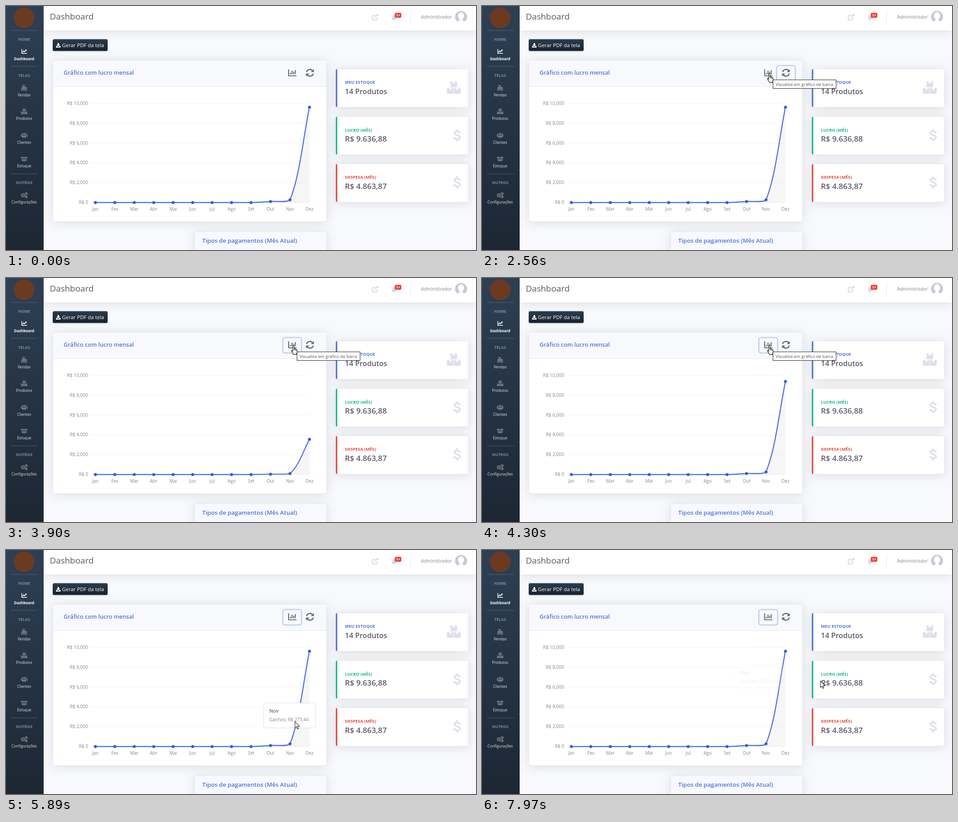
An HTML page that plays this animation: 1036x540 px, repeating every 8000 ms.

```html
<!DOCTYPE html>
<html lang="pt-BR">
<head>
<meta charset="utf-8">
<title>Dashboard</title>
<style>
html, body { margin: 0; width: 100%; height: 100%; overflow: hidden; background: #f8f9fc; }
svg { display: block; width: 100vw; height: 100vh; }
text { font-family: "Open Sans", "Noto Sans", sans-serif; white-space: pre; }
.shadow { filter: drop-shadow(0 2px 11px rgba(58, 59, 69, .15)); }
.lift { filter: drop-shadow(0 1.5px 2px rgba(58, 59, 69, .2)); }
</style>
</head>
<body>
<svg id="stage" viewBox="0 0 1036 540" preserveAspectRatio="none" xmlns="http://www.w3.org/2000/svg"></svg>
<script>
const LOOP = 8000, ANIM = 800, HOVER = 320;
const BLUE = '#4e73df', INK = '#5a5c69', GREY = '#858796', PALE = '#dddfeb', ICON = '#6b6d78';
const BASE = 435, TOP = 216;
const TO_BAR = 2624, TO_LINE = 3814;
const MONTHS = 'Jan Fev Mar Abr Mai Jun Jul Ago Set Out Nov Dez'.split(' ');
const profit = i => [104, 273.44, 9636.88][i - 9] || 0;
const yOf = v => BASE - v / 10000 * (BASE - TOP);
const lineX = i => 197 + i * 42.9;
const barX = i => 214.3 + i * 39.53;

const clamp = (v, a = 0, b = 1) => Math.min(b, Math.max(a, v));
const mix = (a, b, k) => a + (b - a) * k;
const quart = p => 1 - (1 - clamp(p)) ** 4;
const ramp = (t, from, len = 120) => clamp((t - from) / len);

// Markup helpers
const text = (x, y, s, size, fill, extra = '') =>
  `<text x="${x}" y="${y}" font-size="${size}" fill="${fill}" ${extra}>${s}</text>`;
const rect = (x, y, w, h, fill, extra = '') =>
  `<rect x="${x}" y="${y}" width="${w}" height="${h}" fill="${fill}" ${extra}/>`;
const path = (d, fill, extra = '') => `<path d="${d}" fill="${fill}" ${extra}/>`;
const at = (x, y, s, body, extra = '') =>
  `<g transform="translate(${x} ${y}) scale(${s})" ${extra}>${body}</g>`;
const stroke = (color, w) => `stroke="${color}" stroke-width="${w}" stroke-linecap="round" stroke-linejoin="round"`;
const MID = ' text-anchor="middle" ', END = ' text-anchor="end" ', SEMI = ' font-weight="600" ', BOLD = ' font-weight="700" ';

// Icons, each centred on 0,0
const crate = (x, y, c) => path(`M${x} ${y}h5v5l2.3-1.5 2.3 1.5v-5h4.9v13h-14.5z`, c);
const boxes = c => crate(-7.2, -14, c) + crate(-15, .5, c) + crate(.6, .5, c);
const dollar = c => path('M6 -5C4.5 -9.5 -6 -10 -6 -4.8S6.4 -.6 6.4 4.8S-4.5 9.5 -6.6 5.4M0 -12.5V-9M0 9V12.5', 'none', stroke(c, 3.6));
const axes = c => path('M-8 -7V6.5H8.5', 'none', stroke(c, 2.2));
const barIcon = c => axes(c) + path('M-4 3V0M-.5 3V-5M3 3V-2M6.5 3V-6', 'none', `stroke="${c}" stroke-width="2.2"`);
const lineIcon = c => axes(c) + path('M-5 2.5L-1.5 -2 1.5 1.5 6 -4', 'none', stroke(c, 2.4)) + path('M2.8 -6.2H8.2V-.8Z', c);
const refreshIcon = c => path('M-7.2 -1.6A7.2 7.2 0 0 1 5.6 -4.6M7.2 1.6A7.2 7.2 0 0 1 -5.6 4.6', 'none', `stroke="${c}" stroke-width="2.7"`) +
  path('M8.6 -8.4V-1.5H1.7ZM-8.6 8.4V1.5H-1.7Z', c);
const register = c => path('M-4 -6H2V-3.5H0V-2H5L6.5 3H-6.5L-5 -2H-2V-3.5H-4ZM-6.5 3.8H6.5V6H-6.5Z', c);
const person = (x, y, s, c) => at(x, y, s, `<circle cy="-3" r="2.6" fill="${c}"/>` + path('M-4.5 5V3Q-4.5 .5 -2 .5H2Q4.5 .5 4.5 3V5Z', c));
const users = c => person(-5, -.5, .65, c) + person(5, -.5, .65, c) + person(0, .5, 1, c);
const openBox = c => path('M-6 -5L0 -4.2 6 -5 7.5 -1.8 2 -.2 0 -3.4 -2 -.2 -7.5 -1.8ZM-5.6 0L-1.6 1.2 0 -1 1.6 1.2 5.6 0V3.8L0 5.2 -5.6 3.8Z', c);
const cog = (x, y, r, c) => `<circle cx="${x}" cy="${y}" r="${r}" fill="none" stroke="${c}" stroke-width="2"/>` +
  `<circle cx="${x}" cy="${y}" r="${r + 1.5}" fill="none" stroke="${c}" stroke-width="1.4" stroke-dasharray="1.6 1.9"/>`;
const cogs = c => cog(-2.6, .5, 2.7, c) + cog(4.6, -3.2, 1.4, c) + cog(4.6, 3.8, 1.4, c);

function sidebar() {
  const dim = '#6d7884', faint = '#7f8a95', soft = '#e4e7ea';
  const items = [['Vendas', 181, register], ['Produtos', 233, c => at(0, 0, .46, boxes(c))],
    ['Clientes', 286, users], ['Estoque', 338.5, openBox], ['Configurações', 418.5, cogs]];
  let s = rect(0, 0, 83, 540, 'url(#side)') + '<circle cx="40" cy="26" r="23" fill="#6b3a20"/>';
  for (const y of [54, 133.5, 371.5]) s += rect(10, y - .5, 60, 1, '#fff', 'opacity=".2"');
  for (const [label, y] of [['HOME', 77], ['TELAS', 156.5], ['OUTROS', 394.3]])
    s += text(40, y, label, 8.9, faint, MID + BOLD);
  s += at(40, 100.5, .66, lineIcon('#fff')) + text(40, 120, 'Dashboard', 8.2, '#fff', MID + BOLD);
  for (const [label, y, icon] of items)
    s += at(40, y, 1, icon(dim)) + text(40, y + 18.7, label, 8.4, soft, MID);
  return s;
}

function topbar() {
  const c = '#d1d3e2';
  return rect(83, 0, 953, 54, '#fff', 'class="shadow"') +
    text(96.5, 30, 'Dashboard', 18.8, INK) +
    at(813.5, 25, 1, path('M1 -4H-4.5Q-6 -4 -6 -2.5V5Q-6 6 -4.5 6H3Q4.5 6 4.5 5V1.5M-1.5 1.5L6 -6', 'none', stroke(c, 1.7)) + path('M2 -7H7.3V-1.7Z', c)) +
    at(856, 25.5, 1, path('M-6 4Q-4 2 -4 -1Q-4 -5 0 -6Q4 -5 4 -1Q4 2 6 4ZM-1.8 5H1.8Q1.4 6.8 0 6.8T-1.8 5Z', c)) +
    rect(857, 15, 14.5, 11, '#e74a3b', 'rx="3"') + text(864.2, 23.2, '1+', 7.2, '#fff', MID + BOLD) +
    rect(891, 9, 1, 31, '#e3e6f0') + text(915, 27.8, 'Administrador', 10.1, GREY) +
    '<circle cx="1003" cy="24" r="13.2" fill="#c3cbdc"/><clipPath id="face"><circle cx="1003" cy="24" r="13.2"/></clipPath>' +
    '<g clip-path="url(#face)" fill="#fff"><ellipse cx="1003" cy="22" rx="6.6" ry="8.6"/><path d="M1000 28h6v4q5 1 7 4v3h-20v-3q2-3 7-4z"/></g>';
}

function infoCard(y, color, label, value, size, icon) {
  return `<g class="shadow">${rect(727, y, 292, 84.5, '#fff', 'rx="4" stroke="#e3e6f0" stroke-width=".8"')}</g>` +
    path(`M731 ${y}q-4 0 -4 4v76.5q0 4 4 4h-1v-84.5z`, color) + rect(727, y + 2.5, 3.2, 79.5, color) +
    text(747, y + 32.8, label, 9.4, color, BOLD) +
    text(747, y + 55.6, value, size, INK, SEMI) + icon;
}

function cards() {
  const panel = (x, y, w, h, head) => `<g class="shadow">${rect(x, y, w, h, '#fff', 'rx="4"')}</g>` +
    path(`M${x} ${y + head}V${y + 4}q0 -4 4 -4h${w - 8}q4 0 4 4V${y + head}Z`, '#f8f9fc') +
    rect(x, y + head - .5, w, 1, '#e3e6f0') +
    rect(x, y, w, h, 'none', 'rx="4" stroke="#e3e6f0" stroke-width=".8"');
  return rect(103, 73.5, 121, 26, 'url(#btn)', 'rx="3" class="lift"') +
    at(115.3, 87, 1, path('M-1.5 -5H1.5V-1.5H4L0 2.5 -4 -1.5H-1.5ZM-5 1.5H-2.5L0 4 2.5 1.5H5V5H-5Z', '#fff')) +
    text(123.5, 90.5, 'Gerar PDF da tela', 11.35, '#fff') +
    panel(103.5, 120, 603, 357, 58.5) +
    text(127, 152.3, 'Gráfico com lucro mensal', 12.65, BLUE, SEMI) +
    panel(416, 499, 290.5, 120, 58) +
    text(432.5, 523.6, 'Tipos de pagamentos (Mês Atual)', 13.1, BLUE, SEMI) +
    infoCard(139.5, BLUE, 'MEU ESTOQUE', '14 Produtos', 16.1, at(987, 180.7, 1, boxes(PALE))) +
    infoCard(244.8, '#1cb885', 'LUCRO (MÊS)', 'R$ 9.636,88', 17, at(994.5, 286, 1, dollar(PALE))) +
    infoCard(349.5, '#e74a3b', 'DESPESA (MÊS)', 'R$ 4.863,87', 17, at(994.5, 390.5, 1, dollar(PALE)));
}

function scales(x0, x1, labelX, prefix, monthX) {
  let s = '';
  for (let k = 0; k <= 5; k++) {
    const y = yOf(k * 2000), label = k ? k * 2 + ',000' : '0';
    s += path(`M${x0} ${y}H${x1}`, 'none', `stroke="${k ? '#e7e9f1' : PALE}" stroke-dasharray="1.6 1.6"`) +
      text(labelX, y + 3, prefix + label, 10.2, GREY, END);
  }
  return s + MONTHS.map((m, i) => text(monthX(i).toFixed(1), 452.5, m, 9.9, GREY, MID)).join('');
}

// Smoothed line: two control points per data point, tension 0.3
const points = MONTHS.map((_, i) => ({ x: lineX(i), y: yOf(profit(i)) }));
const handles = points.map((c, i) => {
  const p = points[i - 1] || c, n = points[i + 1] || c;
  const before = Math.hypot(c.x - p.x, c.y - p.y), after = Math.hypot(n.x - c.x, n.y - c.y);
  const move = k => ({ x: c.x + k * (n.x - p.x), y: clamp(c.y + k * (n.y - p.y), TOP, BASE) });
  const f = .3 / (before + after);
  return [move(-f * before), move(f * after)];
});
function curve(k) {
  const xy = p => p.x.toFixed(2) + ' ' + mix(BASE, p.y, k).toFixed(2);
  return points.map((p, i) => i ? `C${xy(handles[i - 1][1])} ${xy(handles[i][0])} ${xy(p)}` : 'M' + xy(p)).join('');
}

const arrow = at(0, 0, .92, path('M0 0V15.6L3.6 12.3 6 17.8 8.3 16.8 6 11.4H10.8Z', '#fff', 'stroke="#111" stroke-width="1.1"'), 'id="arrow"');
const hand = `<g id="hand">${path('M-1.4 1.5C-1.4 -.4 1.4 -.4 1.4 1.5V7.3C1.6 6 3.7 6.2 3.8 7.7V8.4C4.2 7.2 6.1 7.5 6.1 9V9.7C6.5 8.8 8 9 8 10.5V14.5C8 16.4 7 17.2 6.8 19.6H-.2C-.5 17.6 -3.3 14.8 -4.3 12.3C-4.9 10.6 -3 10 -2.2 11.4L-1.4 12.6Z', '#fff', 'stroke="#111" stroke-width="1.1"')}${path('M1.4 7.3V10.5M3.8 8.4V11M6.1 9.7V11.5', 'none', 'stroke="#111" stroke-width=".9"')}</g>`;

const stage = document.getElementById('stage');
stage.innerHTML = `<defs>
  <linearGradient id="side" x2="0" y2="1"><stop stop-color="#2d4054"/><stop offset="1" stop-color="#1c2733"/></linearGradient>
  <linearGradient id="btn" x2="0" y2="1"><stop stop-color="#2b3c4d"/><stop offset="1" stop-color="#18222d"/></linearGradient>
</defs>` + rect(0, 0, 1036, 540, '#f8f9fc') + topbar() + sidebar() + cards() +
  `<g id="lines">${scales(189, 669, 181, 'R$ ', lineX)}
    <path id="area" fill="#3a3b45" fill-opacity=".045"/><path id="curve" fill="none" stroke="${BLUE}" stroke-width="2.4"/>
    ${points.map(() => `<g class="dot"><circle r="3.5" fill="${BLUE}"/><circle r="1.4" fill="#26397d"/></g>`).join('')}</g>
  <g id="bars">${scales(188, 666, 178.5, 'R$', barX)}${MONTHS.map((_, i) => rect(barX(i) - 10.4, BASE, 20.8, 0, BLUE, 'class="bar"')).join('')}</g>
  <rect id="ring" y="131.7" width="41.5" height="34.3" rx="5" fill="none" stroke="#c3cff3" stroke-width="2.6"/>
  <g id="barIcon">${at(631, 148, 1, barIcon(ICON))}</g><g id="lineIcon">${at(631, 148, 1, lineIcon(ICON))}</g>
  <g id="refresh">${at(670, 147.8, 1, refreshIcon(ICON))}</g>
  <g id="tip"><rect id="tipBox" height="55" rx="5" fill="#fff" stroke="${PALE}"/>
    ${text(12.5, 21.5, '', 11, '#6e707e', SEMI + 'id="tipTitle"')}${text(12.5, 40, '', 10, GREY, 'id="tipBody"')}</g>
  <g id="hint" opacity="0">${rect(694, 128.5, 165, 41, '#151515', 'rx="3.5"')}${path('M694.5 143.5V153.5L689 148.5Z', '#151515')}
    ${text(776.5, 144.3, 'Clique para atualizar o', 10.7, '#fff', MID + SEMI)}${text(776.5, 161.3, 'gráfico', 10.7, '#fff', MID + SEMI)}</g>
  <g id="native"><rect id="nativeBox" x="641.5" y="163.5" height="19" fill="#fff" stroke="#222"/>
    ${text(647.3, 176.6, '', 9.45, '#505050', 'id="nativeText"')}</g>
  <g id="cursor">${arrow}${hand}</g>`;

const el = {};
stage.querySelectorAll('[id]').forEach(n => el[n.id] = n);
const dots = stage.querySelectorAll('.dot'), bars = stage.querySelectorAll('.bar');
const set = (node, attrs) => { for (const k in attrs) node.setAttribute(k, attrs[k]); };
const show = (node, on) => set(node, { display: on ? 'inline' : 'none' });

// Pointer stops: time, x, y
const route = [[220, 1010, 147], [500, 748, 127], [850, 748, 127], [1090, 668, 150.5], [1690, 668, 150.5],
  [2210, 633.5, 149.5], [4440, 633.5, 149.5], [4580, 644, 181], [4940, 673, 221], [5330, 673, 221],
  [5890, 637, 379.5], [6130, 624, 424], [6170, 624, 424], [6210, 624, 426], [6510, 624, 426],
  [6850, 585, 428], [7650, 585, 428], [7970, 746, 290]];
function pointer(t) {
  const i = route.findIndex(r => r[0] > t);
  if (i < 0) return route[route.length - 1].slice(1);
  const a = route[Math.max(0, i - 1)], b = route[i], k = clamp((t - a[0]) / (b[0] - a[0] || 1));
  return [mix(a[1], b[1], k), mix(a[2], b[2], k)];
}

// Chart tooltip: each hover eases from wherever the box is at that moment
const dez = { name: 'Dez', value: '9.636,88', x: 562, y: 239, w: 121 };
const nov = { name: 'Nov', value: '273,44', x: 569, y: 361, w: 113 };
const out = { name: 'Out', value: '104,00', x: 527, y: 363, w: 113 };
const hovers = [[4640, dez, 1], [5780, nov, 1], [6630, out, 1], [7840, dez, 0]];
function tooltip(t) {
  let cur = { ...dez, a: 0 };
  hovers.forEach(([start, spot, a], i) => {
    if (t < start) return;
    const stop = Math.min(t, i + 1 < hovers.length ? hovers[i + 1][0] : LOOP);
    const k = quart((stop - start) / HOVER), next = { ...spot, a };
    for (const key of ['x', 'y', 'w', 'a']) next[key] = mix(cur[key], next[key], k);
    cur = next;
  });
  return cur;
}

function draw(t) {
  const barMode = t >= TO_BAR && t < TO_LINE;
  show(el.bars, barMode);
  show(el.lines, !barMode);
  show(el.lineIcon, barMode);
  show(el.barIcon, !barMode);
  if (barMode) {
    const k = quart((t - TO_BAR) / ANIM);
    bars.forEach((b, i) => {
      const h = (BASE - yOf(profit(i))) * k;
      set(b, { y: BASE - h, height: h });
    });
  } else {
    const k = t < TO_BAR ? 1 : quart((t - TO_LINE) / ANIM), d = curve(k);
    set(el.curve, { d });
    set(el.area, { d: d + `V${BASE}H${lineX(0)}Z` });
    dots.forEach((n, i) => set(n, { transform: `translate(${points[i].x} ${mix(BASE, points[i].y, k)})` }));
  }

  set(el.ring, { x: t < TO_BAR ? 649.2 : 610.2, opacity: ramp(t, 1400) });
  set(el.refresh, { opacity: t > 1060 && t < 1960 ? .8 : 1 });
  set(el.hint, { opacity: ramp(t, 1060) * (1 - ramp(t, 1960)) });

  show(el.native, t >= 2560 && t < 4460);
  el.nativeText.textContent = 'Visualize em gráfico de ' + (barMode ? 'linha' : 'barra');
  set(el.nativeBox, { width: barMode ? 137.5 : 139 });

  const tip = tooltip(t);
  show(el.tip, tip.a > .005);
  set(el.tip, { opacity: tip.a, transform: `translate(${tip.x} ${tip.y})` });
  set(el.tipBox, { width: tip.w });
  el.tipTitle.textContent = tip.name;
  el.tipBody.textContent = 'Ganhos: R$ ' + tip.value;

  const [x, y] = pointer(t), onButton = y > 131 && y < 166 && x > 610 && x < 691;
  show(el.cursor, t >= 220);
  show(el.hand, onButton);
  show(el.arrow, !onButton);
  set(el.cursor, { transform: `translate(${x} ${y})` });
}

const begin = performance.now();
function tick() {
  draw((performance.now() - begin) % LOOP);
  requestAnimationFrame(tick);
}
tick();
</script>
</body>
</html>
```
